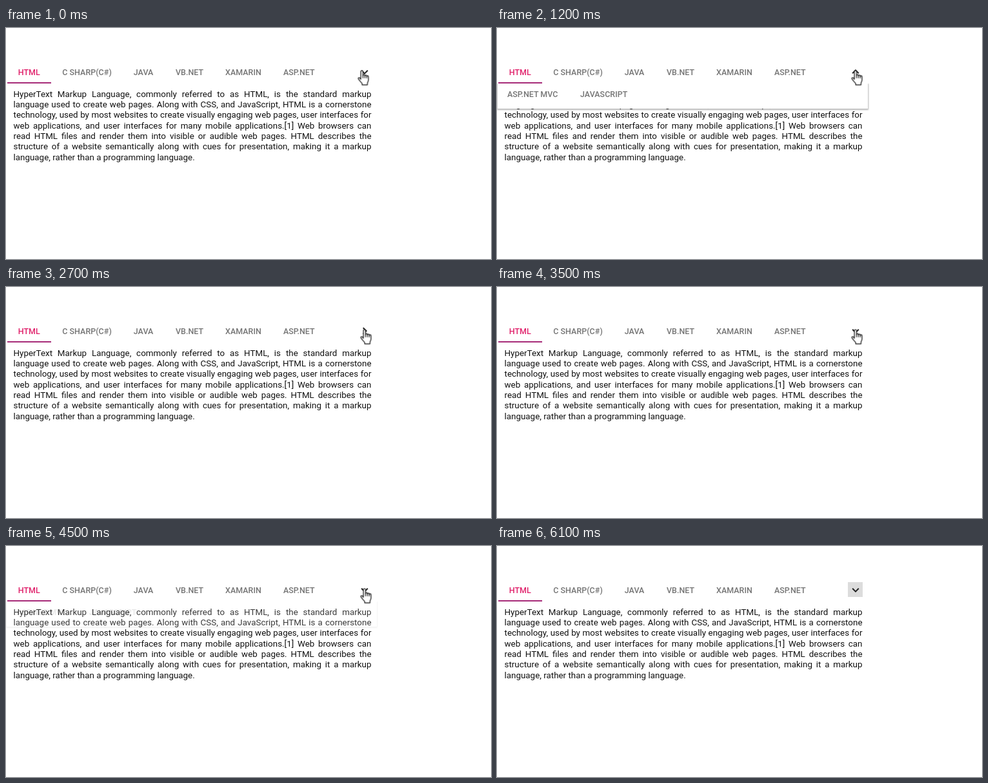
An HTML page that plays this animation: 752 by 358 pixels, repeating every 6.3 s.

```html
<!DOCTYPE html>
<html lang="en">
<head>
<meta charset="utf-8">
<title>Tabs with popup overflow</title>
<style>
  html, body { margin: 0; width: 100%; height: 100%; overflow: hidden; background: #fff; }
  body { position: relative; font-family: Roboto, sans-serif; }

  .tab {
    position: absolute; top: 61px;
    font-size: 12.5px; font-weight: 500; line-height: 15px;
    white-space: nowrap; color: #757575;
  }
  .tab.active { color: #e0206a; }
  .bar { position: absolute; left: 2px; top: 84px; width: 68px; height: 2px; background: #a62b78; }

  .content {
    position: absolute; left: 11.5px; top: 94.6px; width: 555px; margin: 0;
    font-size: 13.4px; line-height: 16.33px; color: #111;
    white-space: nowrap; text-align: justify; text-align-last: justify;
  }
  .content span { display: block; text-align-last: left; }

  .clip { position: absolute; left: 0; top: 86px; width: 580px; height: 46px; overflow: hidden; }
  .popup {
    position: absolute; left: 1px; top: 0; width: 574px; height: 39px;
    background: #fff;
    box-shadow: 0 1px 2px 1px rgba(0, 0, 0, .28);
    animation: fade 6.3s step-end infinite;
  }
  .popup .tab { top: 9px; }

  svg { position: absolute; left: 0; top: 0; overflow: visible; }
  .hover { fill: #dcdcdc; animation: hover 6.3s step-end infinite; }
  .arrow {
    fill: none; stroke: #222; stroke-width: 2;
    transform-origin: 556px 68px;
    animation: turn 6.3s step-end infinite;
  }
  .hand {
    fill: #fff; stroke: #111; stroke-width: 1.2; stroke-linejoin: round; stroke-linecap: round;
    animation: move 6.3s step-end infinite, leave 6.3s step-end infinite;
  }

  @keyframes fade {
    0% { opacity: 0; }
    17.46% { opacity: .6; }
    19.04% { opacity: 1; }
    41.26% { opacity: .4; }
    42.85% { opacity: 0; }
    57.14% { opacity: .5; }
    58.73% { opacity: .97; }
    60.31% { opacity: 1; }
    69.84% { opacity: .6; }
    71.42% { opacity: .18; }
    73.01% { opacity: .05; }
    74.6%, 100% { opacity: 0; }
  }
  @keyframes turn {
    0% { transform: none; }
    17.46% { transform: rotate(-90deg); }
    19.04% { transform: rotate(-180deg); }
    39.68% { transform: none; }
    42.85% { transform: rotate(-90deg); }
    44.44% { transform: none; }
    60.31% { transform: rotate(-180deg); }
    68.25% { transform: rotate(-90deg); }
    69.84%, 100% { transform: none; }
  }
  @keyframes move {
    0% { transform: translate(545.5px, 65.5px); }
    7.93% { transform: translate(547.5px, 65.5px); }
    9.52%, 100% { transform: translate(549.5px, 65.5px); }
  }
  @keyframes leave {
    0% { opacity: 1; }
    79.36%, 100% { opacity: 0; }
  }
  @keyframes hover {
    0% { opacity: 0; }
    79.36%, 100% { opacity: 1; }
  }
</style>
</head>
<body>
  <div class="tab active" style="left:18.7px">HTML</div>
  <div class="tab" style="left:87.3px">C SHARP(C#)</div>
  <div class="tab" style="left:197.8px">JAVA</div>
  <div class="tab" style="left:263px">VB.NET</div>
  <div class="tab" style="left:340px">XAMARIN</div>
  <div class="tab" style="left:430px">ASP.NET</div>

  <p class="content">
    HyperText Markup Language, commonly referred to as HTML, is the standard markup<br>
    language used to create web pages. Along with CSS, and JavaScript, HTML is a cornerstone<br>
    technology, used by most websites to create visually engaging web pages, user interfaces for<br>
    web applications, and user interfaces for many mobile applications.[1] Web browsers can<br>
    read HTML files and render them into visible or audible web pages. HTML describes the<br>
    structure of a website semantically along with cues for presentation, making it a markup
    <span>language, rather than a programming language.</span>
  </p>

  <div class="clip">
    <div class="popup">
      <div class="tab" style="left:15px">ASP.NET MVC</div>
      <div class="tab" style="left:128px">JAVASCRIPT</div>
    </div>
  </div>
  <div class="bar"></div>

  <svg width="752" height="358">
    <rect class="hover" x="544" y="56" width="23" height="23"/>
    <path class="arrow" d="M551.2 65.8 556 70.6 560.8 65.8"/>
    <g class="hand">
      <path d="M4.6 14V2.2a1.7 1.7 0 0 1 3.4 0V7.8a1.6 1.6 0 0 1 3 .5 1.6 1.6 0 0 1 2.9.7 1.5 1.5 0 0 1 2.6 1.2V15c0 2.2-1.4 3.4-1.6 5.2V22.6H6.6V20.4C4.8 18.4 2.6 16.2.9 13.4c-.8-1.5.7-2.7 2-1.7Z"/>
      <path fill="none" d="M8 7.8v4M11 8.4v3.4M13.9 9.2v2.8"/>
    </g>
  </svg>
</body>
</html>
```
